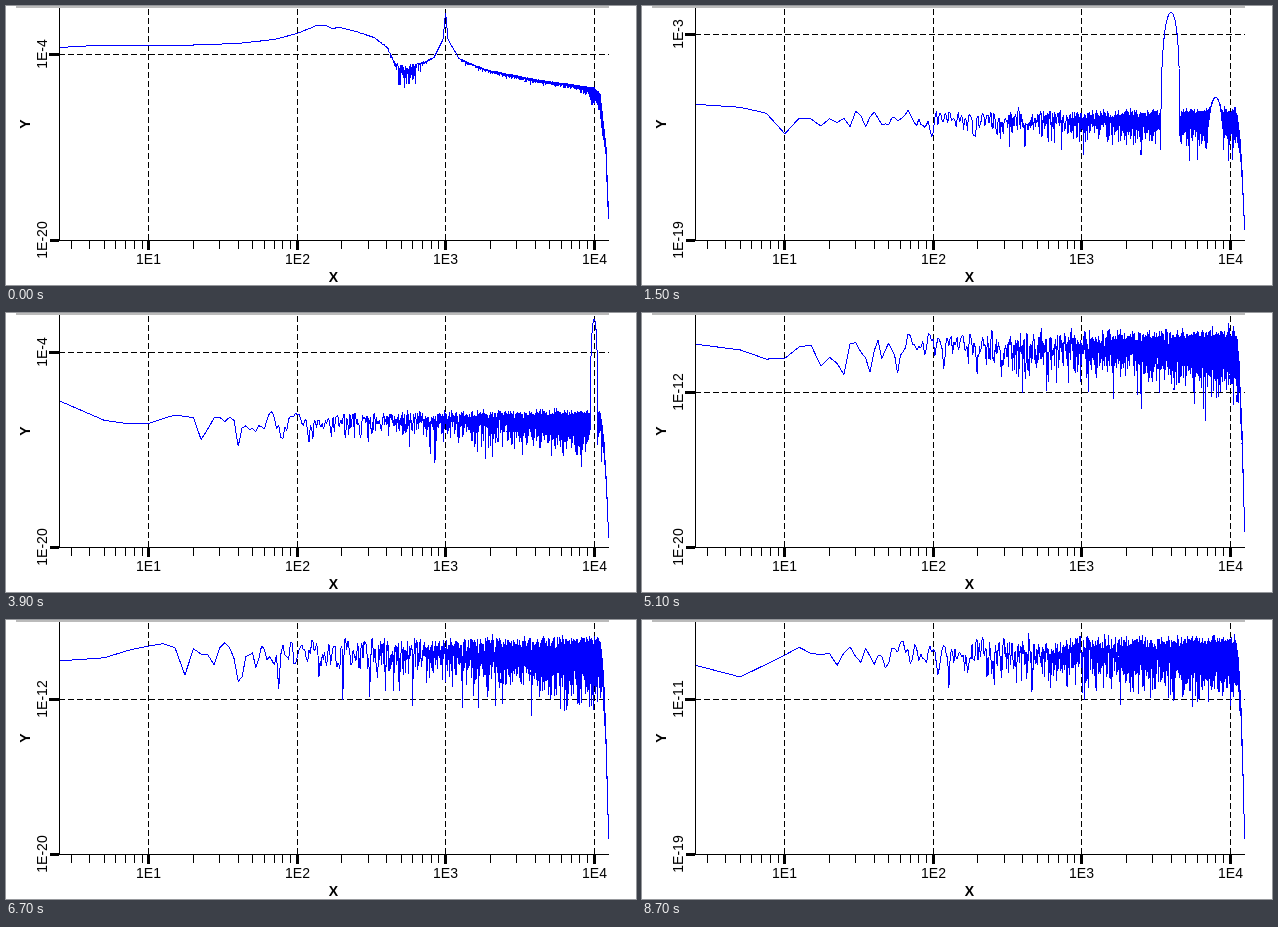
Recreate the animation shown at these times as an HTML page. Size 630 by 279 pixels, loop 9.2 s.

```html
<!DOCTYPE html>
<html lang="en">
<head>
<meta charset="utf-8">
<title>Spectrum sweep</title>
<style>
html, body { margin: 0; width: 100%; height: 100%; overflow: hidden; background: #fff; }
svg { display: block; width: 630px; height: 279px; }
text { font: 14px "Liberation Sans", Arial, sans-serif; font-kerning: none; text-anchor: middle; fill: #000; }
.bold { font-weight: bold; }
path, line, rect { shape-rendering: crispEdges; }
path, line { fill: none; stroke: #000; stroke-width: 1; }
.dash { stroke-dasharray: 6 3; }
.thick { stroke-width: 3; }
#curve { stroke: #00f; stroke-linejoin: bevel; }
</style>
</head>
<body>
<svg viewBox="0 0 630 279">
  <rect x="10" y="0" width="593" height="2" fill="#bbb"/>
  <g id="fixed"></g>
  <line id="grid" class="dash" x1="53" x2="603"/>
  <line id="tick" class="thick" x1="43" x2="53"/>
  <path id="curve"/>
  <path d="M53.5 2V234.5H603"/>
  <text id="hi"></text>
  <text id="lo"></text>
  <text class="bold" x="327.5" y="276">X</text>
  <text class="bold" transform="translate(24 118) rotate(-90)">Y</text>
</svg>
<script>
const TOP = 2, BASE = 234, LOOP = 9200, BINS = 5000, STEP = 2.5, CUTOFF = 10800, NYQUIST = BINS * STEP;
const $ = id => document.getElementById(id);
const xOf = hz => 53.5 + 148.42 * Math.log10(hz / STEP);

// each view spans whole decades, from its lowest to its highest exponent
const lows = [20, 19, 20, 20, 19, 20, 19, 21, 20, 20, 20, 20, 19, 20, 19, 19, 19, 20, 20, 20, 19, 20, 19];
const views = lows.map((n, i) => {
  const lo = -n;
  const top = i === 0 ? 0 : i < 12 ? -1 : i === 12 ? -5 : i < 19 ? -8 : -7;
  const perDecade = (BASE - TOP) / (top - lo);
  const span = top - lo > 16 ? 16 : 8;
  return {
    lo, hi: lo + span, perDecade,
    gridY: Math.round(BASE - span * perDecade),
    start: i < 4 ? [0, 200, 700, 1000][i] : 1500 + 400 * (i - 4),
    tone: 1000 * Math.max(1, i),
    level: i < 19 ? -9.5 : -8.5
  };
});

function random(seed) {
  let s = seed;
  return () => {
    s = s + 0x6D2B79F5 | 0;
    let t = Math.imul(s ^ s >>> 15, 1 | s);
    t = t + Math.imul(t ^ t >>> 7, 61 | t) ^ t;
    return ((t ^ t >>> 14) >>> 0) / 4294967296;
  };
}

// log power of windowed white noise: neighbouring bins blend
function noise(seed) {
  const rnd = random(seed);
  const gauss = () => {
    const r = Math.sqrt(-2 * Math.log(1 - rnd())), q = 2 * Math.PI * rnd();
    return [r * Math.cos(q), r * Math.sin(q)];
  };
  let a = gauss(), b = gauss();
  return () => {
    const c = gauss();
    const part = n => (a[n] + c[n]) / 2 + b[n];
    const power = (part(0) ** 2 + part(1) ** 2) / 3;
    a = b; b = c;
    return Math.max(-4, Math.log10(power));
  };
}

function lobe(hz, centre, width, peak) {
  const u = Math.abs(hz - centre) / width;
  return u < 1 ? 10 ** (peak + 6 * Math.log10(Math.cos(u * Math.PI / 2))) : 0;
}

function toneY(view, k, n) {
  const hz = k * STEP, { tone, level, lo } = view;
  const edge = Math.max(0, (hz - CUTOFF) / (NYQUIST - CUTOFF));
  let power = 10 ** (level + n * (1 - edge));
  if (tone < NYQUIST) {
    power *= 10 ** (1.2 / k ** 1.5);
    power += lobe(hz, tone, 600, -1.3) + lobe(hz, 2 * tone, 1200, -7.9);
  }
  const drop = (level - lo - .8) * edge ** 2.2;
  return BASE + .5 - (Math.log10(power) - drop - lo) * view.perDecade;
}

// outline of the opening transient
const outline = [
  [53, 41], [98, 38.5], [187, 38.5], [232, 37], [268, 33], [291, 27], [312, 18.5], [319, 18.5],
  [327, 22.5], [332, 20.5], [350, 25], [368, 31], [382, 41], [389, 57], [410, 58], [428, 51],
  [437, 33], [439.6, 6], [442, 33], [453, 52], [480, 63], [530, 73], [588, 81], [594, 87],
  [600, 140], [603, 222]
];

function transientY(x, n) {
  const j = outline.findIndex(p => p[0] >= x);
  const [x0, y0] = outline[Math.max(0, j - 1)], [x1, y1] = outline[j];
  const bump = (mid, width) => Math.exp(-(((x - mid) / width) ** 2));
  const size = 11 * bump(402, 14) + 5 * bump(592, 12) + (x > 455 ? 1.6 : 0);
  return y0 + (y1 - y0) * (x - x0) / (x1 - x0) + .5 + Math.max(0, .3 - n) * size;
}

function spectrum(view, i) {
  const next = noise(977 * i + 31);
  let d = "";
  for (let k = 1; k <= BINS; k++) {
    const x = xOf(k * STEP), n = next();
    const y = i ? toneY(view, k, n) : transientY(x, n);
    d += (k > 1 ? "L" : "M") + x.toFixed(1) + " " + Math.max(3, Math.min(232.5, y)).toFixed(1);
  }
  return d;
}

function drawFixed() {
  let out = `<line class="thick" x1="44" x2="53" y1="234.5" y2="234.5"/>`;
  for (let n = 0; n < 5; n++) {
    for (let m = 1; m < 10; m++) {
      const hz = m * 10 ** n;
      if (hz < STEP || hz > NYQUIST) continue;
      const x = Math.floor(xOf(hz)) + .5;
      if (m > 1) out += `<line x1="${x}" x2="${x}" y1="235" y2="243"/>`;
      else out += `<line class="dash" x1="${x}" x2="${x}" y1="234" y2="2"/>` +
        `<line class="thick" x1="${x}" x2="${x}" y1="235" y2="244"/>` +
        `<text x="${x}" y="258">1E${n}</text>`;
    }
  }
  $("fixed").innerHTML = out;
}

function label(id, exp, y) {
  $(id).textContent = "1E" + exp;
  $(id).setAttribute("transform", `translate(41 ${y}) rotate(-90)`);
}

function show(i) {
  const { lo, hi, gridY } = views[i];
  for (const id of ["grid", "tick"])
    for (const end of ["y1", "y2"]) $(id).setAttribute(end, gridY + .5);
  label("hi", hi, gridY);
  label("lo", lo, BASE);
  $("curve").setAttribute("d", curves[i]);
}

const t0 = performance.now();
drawFixed();
const curves = views.map(spectrum);
let shown = -1;

function frame() {
  const t = Math.max(0, performance.now() - t0) % LOOP;
  const i = views.filter(v => v.start <= t).length - 1;
  if (i !== shown) show(shown = i);
  requestAnimationFrame(frame);
}
frame();
</script>
</body>
</html>
```
